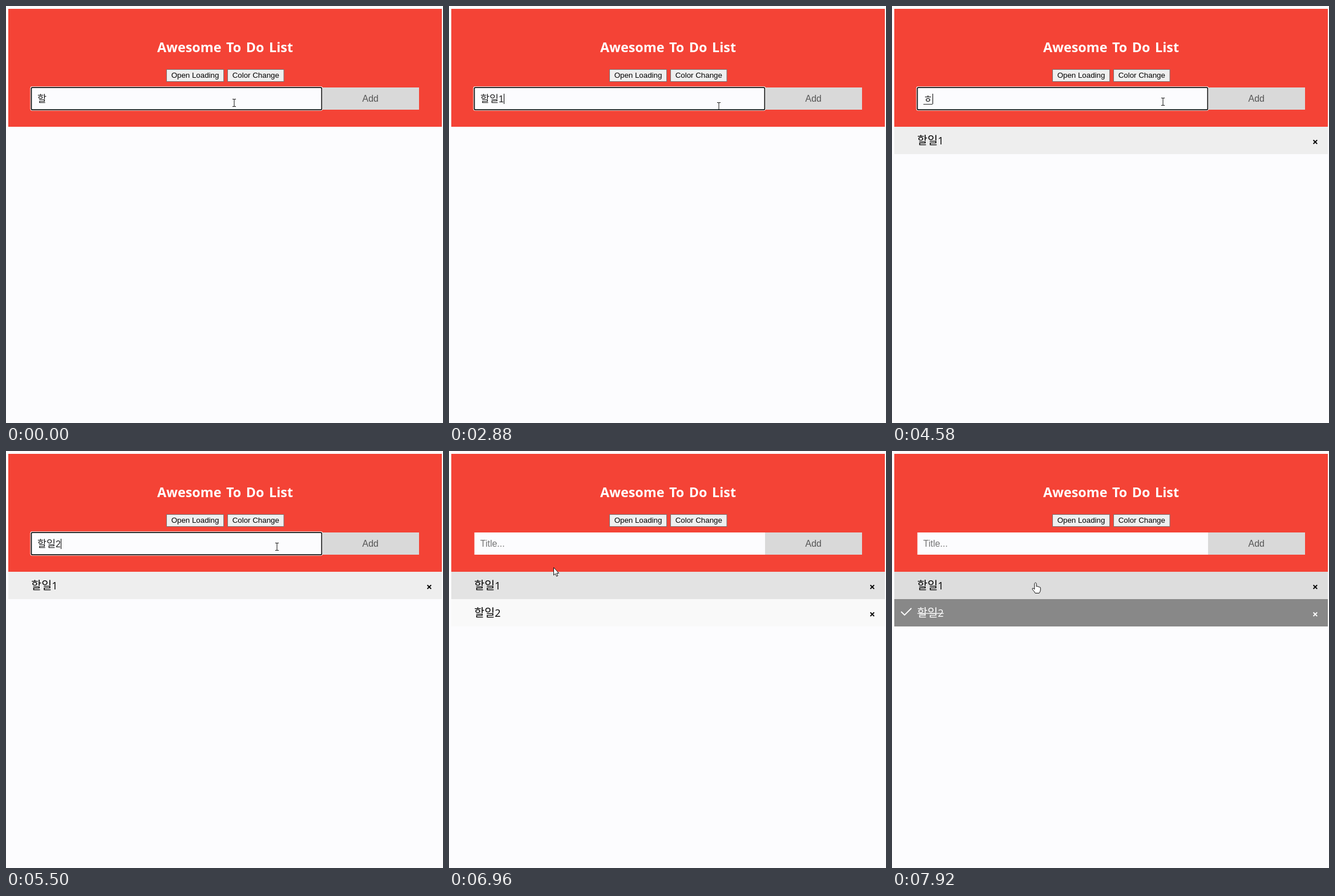
Animation, 766 px wide and 732 px high, one loop 8000 ms. Source, as an HTML page with a canvas:

```html
<!DOCTYPE html>
<html lang="ko">
<head>
<meta charset="utf-8">
<title>Awesome To Do List</title>
<style>
html, body { margin: 0; width: 100%; height: 100%; overflow: hidden; }
canvas { display: block; width: 100vw; height: 100vh; }
</style>
</head>
<body>
<canvas id="stage" width="766" height="732"></canvas>
<script>
const ctx = document.getElementById('stage').getContext('2d');
const LOOP = 8000;
const ARIAL = '"Liberation Sans", Arial, sans-serif';
const HANGUL = '"Noto Sans CJK KR", "Noto Sans CJK", sans-serif';
const HUMANIST = '"Open Sans", "Noto Sans", sans-serif';

// time, text, composing, focused, start of the caret blink (default: time)
const field = [
  [0, '할', false, true, -600], [80, '', false, true, 0],
  [1080, '', false, false], [1580, '', false, true],
  [1700, 'ㅎ', true, true], [1830, '하', true, true], [1960, '할', true, true],
  [2090, '할ㅇ', true, true], [2200, '할이', true, true], [2310, '할일', true, true],
  [2440, '할일1', false, true],
  [3700, '', false, false], [4420, '', false, true],
  [4560, 'ㅎ', true, true], [4710, '하', true, true], [4830, '할', true, true],
  [4920, '할ㅇ', true, true], [5040, '할이', true, true], [5180, '할일', true, true],
  [5380, '할일2', false, true],
  [6480, '', false, false]
];
const firstAdded = 3700, secondAdded = 6480, secondChecked = 7580;

// time, x, y of the pointer's hot spot
const pointerPath = [
  [0, 400, 170], [830, 400, 170], [1060, 425, 245], [1120, 425, 245],
  [1380, 461, 192], [1560, 473, 174], [2500, 473, 174], [2700, 473, 176],
  [2960, 473, 176], [3290, 535, 108], [3560, 640, 160], [4170, 640, 160],
  [4400, 475, 168], [5880, 475, 168], [6120, 660, 152], [6300, 663, 149],
  [6500, 663, 149], [6720, 420, 235], [6960, 183, 204], [7220, 190, 282],
  [7600, 195, 280], [7920, 251.5, 231]
];
// start and end of each hover
const addHovers = [[3440, 4290], [6000, 6580]];
const firstHovers = [[6650, 6880], [7010, 7130], [7740, LOOP + 400]];
const secondHovers = [[7130, 7740]];

const arrow = new Path2D('M.5.5V14L3.5 11.2 5.6 16 7.7 15 5.7 10.4H9.6Z');
const hand = new Path2D('M-1.7 11V1.5Q0-1.5 1.7 1.5V7Q3.5 5.5 4.6 7.4Q6.3 6.3 7 8.2Q9 7.5 8.8 10V13Q8.5 16 6.5 18.5H-.5Q-1.5 16-5 12.5Q-6.5 10-4.5 9.8Q-3 10-1.7 12Z');
const beam = new Path2D('M-3-6.5H-1L0-6 1-6.5H3M0-6V6M-3 6.5H-1L0 6 1 6.5H3');
const checkMark = new Path2D('M16 282L22 288 34 276');

const clamp = v => Math.max(0, Math.min(1, v));
const smooth = v => v * v * (3 - 2 * v);
const mix = (a, b, k) => a + (b - a) * k;
const gray = v => `rgb(${v},${v},${v})`;
const progress = (t, start, duration) => smooth(clamp((t - start) / duration));
const hoverLevel = (t, spans, duration) => clamp(spans.reduce((sum, [start, end]) =>
  sum + progress(t, start, duration) - progress(t, end, duration), 0));
const latest = (list, t) => list.filter(entry => entry[0] <= t).pop();

function rect(color, x, y, w, h, radius = 0) {
  ctx.fillStyle = color;
  ctx.beginPath();
  ctx.roundRect(x, y, w, h, radius);
  ctx.fill();
}

function label(text, x, y, font, color, align = 'left') {
  ctx.font = font;
  ctx.fillStyle = color;
  ctx.textAlign = align;
  ctx.fillText(text, x, y);
  return ctx.measureText(text).width;
}

// Hangul with an optional trailing digit; returns the total width
function todoText(text, x, y, size, digitFont, digitY, color) {
  const syllables = text.replace(/\d/, '');
  const width = label(syllables, x, y, `${size}px ${HANGUL}`, color);
  return width + label(text.slice(syllables.length), x + width, digitY, digitFont, color);
}

function button(text, x, w) {
  rect('#767676', x, 111, w, 22);
  rect('#efefef', x + 1, 112, w - 2, 20);
  label(text, x + w / 2, 126, `13.333px ${ARIAL}`, '#000', 'center');
}

function drawHeader(t) {
  rect('#f44336', 4, 5, 760, 207);
  ctx.wordSpacing = '2.5px';
  label('Awesome To Do List', 384, 81, `bold 23.3px ${HUMANIST}`, '#fff', 'center');
  ctx.wordSpacing = '0px';
  button('Open Loading', 281, 101);
  button('Color Change', 388, 99.5);
  rect(gray(mix(217, 187, hoverLevel(t, addHovers, 300))), 554, 143, 170, 39);
  label('Add', 638.7, 168, `16px ${ARIAL}`, '#555', 'center');
}

function drawField(t) {
  const [time, text, composing, focused, blinkStart = time] = latest(field, t);
  if (focused) {
    rect('#fff', 42.5, 141.2, 512.5, 42.6, 3);
    rect('#101010', 43.5, 142.2, 510.7, 40.8, 2.5);
    rect('#fcfcfe', 45.3, 144, 507.2, 37.2, 1);
  } else {
    rect('#fcfcfe', 44.5, 143, 509.5, 39);
  }
  let width = 0;
  if (text) width = todoText(text, 55, 169, 17.4, `16px ${ARIAL}`, 168.5, '#222');
  else label('Title...', 54.7, 168, `16px ${ARIAL}`, '#757575');
  if (composing) rect('#222', 55 + width - 16, 172, 16, 1);
  const caretOn = Math.floor((t - blinkStart) / 500) % 2 === 0;
  if (focused && caretOn) rect('#000', Math.round(55 + width), 154, 1, 18);
}

function drawRow(text, y, background, color) {
  rect(background, 4, y, 760, 48);
  const width = todoText(text, 44.3, y + 31, 19.5, `18px ${HUMANIST}`, y + 31, color);
  label('×', 742, y + 32.5, `bold 18px ${HUMANIST}`, color, 'center');
  return width;
}

function drawList(t) {
  if (t >= firstAdded)
    drawRow('할일1', 212, gray(mix(238, 221, hoverLevel(t, firstHovers, 200))), '#000');
  if (t >= secondAdded) {
    const checked = t >= secondChecked;
    const idle = mix(249, 221, hoverLevel(t, secondHovers, 200));
    const shade = mix(idle, 136, progress(t, secondChecked, 200));
    const width = drawRow('할일2', 260, gray(shade), checked ? '#fff' : '#000');
    if (checked) {
      rect('#fff', 44.5, 284.5, width, 1.3);
      ctx.strokeStyle = '#fff';
      ctx.lineWidth = 1.8;
      ctx.stroke(checkMark);
    }
  }
}

function pointerAt(t) {
  const from = latest(pointerPath, t);
  const to = pointerPath[pointerPath.indexOf(from) + 1] || from;
  const k = progress(t, from[0], to[0] - from[0] || 1);
  return [mix(from[1], to[1], k), mix(from[2], to[2], k)];
}

function drawPointer(t) {
  const [x, y] = pointerAt(t);
  const inForm = x >= 44 && x < 724 && y >= 143 && y < 182;
  const listEnd = 212 + 48 * ((t >= firstAdded) + (t >= secondAdded));
  const overRow = y >= 212 && y < listEnd;
  ctx.save();
  ctx.translate(x, y);
  ctx.strokeStyle = '#111';
  ctx.lineWidth = 1;
  if (inForm && x < 554) {
    ctx.stroke(beam);
  } else {
    const shape = inForm || overRow ? hand : arrow;
    ctx.fillStyle = '#fff';
    ctx.fill(shape);
    ctx.stroke(shape);
  }
  ctx.restore();
}

function draw() {
  const t = performance.now() % LOOP;
  rect('#fcfcfe', 0, 0, 766, 732);
  drawHeader(t);
  drawField(t);
  drawList(t);
  drawPointer(t);
  requestAnimationFrame(draw);
}
draw();
</script>
</body>
</html>
```
